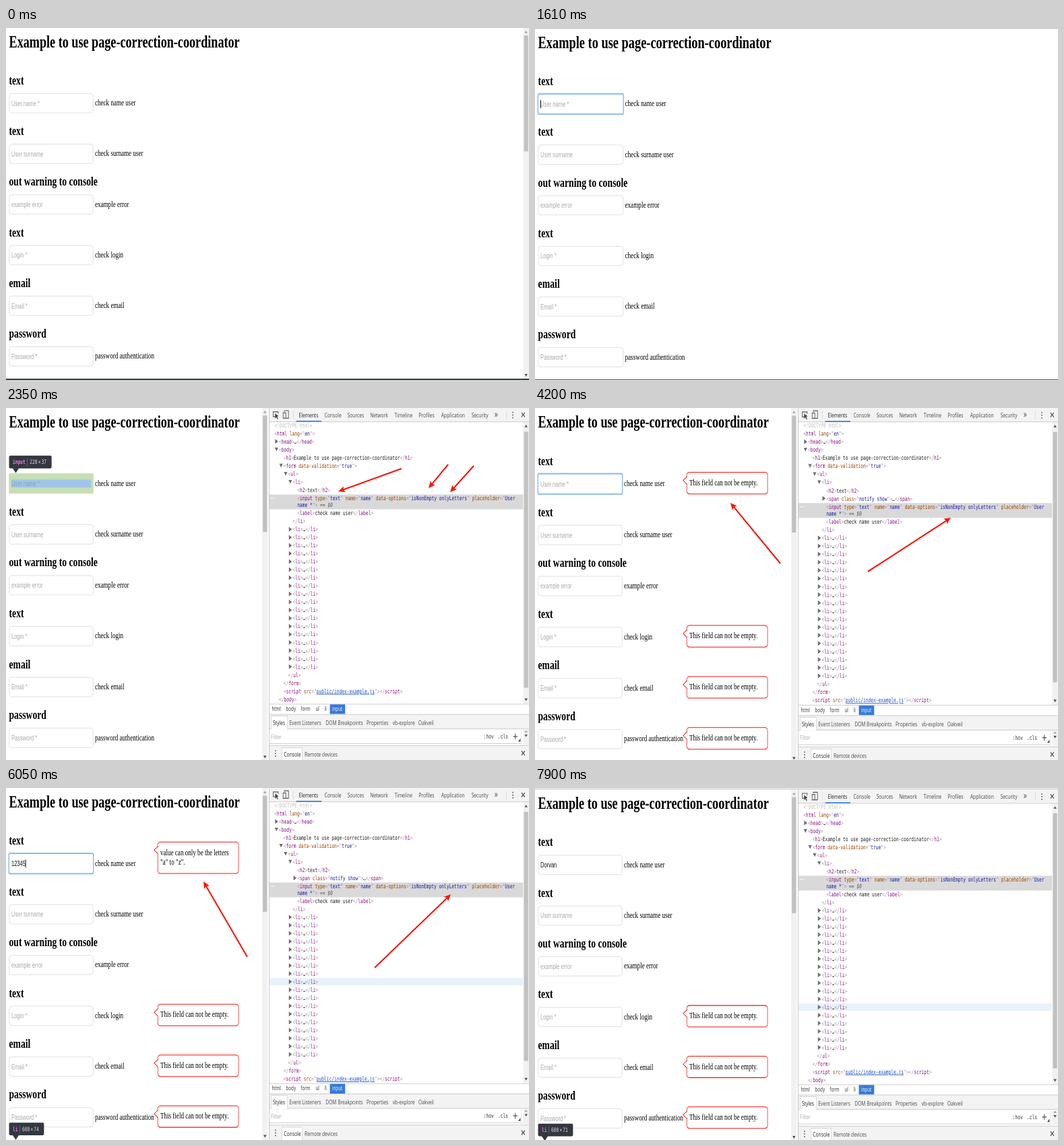
An HTML page for the animation above (8000 ms loop, 776x523 px).

```html
<!DOCTYPE html>
<html lang="en">
<head>
<meta charset="utf-8">
<title>Form check demo</title>
<style>
html, body { margin: 0; width: 100%; height: 100%; overflow: hidden; background: #fff; }
svg { position: absolute; left: 0; top: 0; width: 776px; height: 523px; }
.scene + .scene { opacity: 0; }
text { white-space: pre; }
.h1, .h2 { font: bold 32px "Liberation Serif", serif; }
.h2 { font-size: 24px; }
.label { font: 16px "Liberation Serif", serif; }
.field { font: 13.33px "Liberation Sans", sans-serif; }
.ui { font: 11.8px "Open Sans", sans-serif; fill: #4a4a4a; }
.crumb { font: 11px "Open Sans", sans-serif; fill: #333; }
.code { font: 11px "DejaVu Sans Mono", monospace; fill: #222; }
.br { fill: #a894a6; }
.tag { fill: #881280; }
.attr { fill: #994500; }
.val { fill: #1a1aa6; }
.link { fill: #1a4fc0; text-decoration: underline; }
</style>
</head>
<body>
<svg id="stage" viewBox="0 0 776 523"></svg>
<script>
const LOOP = 8000;
const TITLE = 'Example to use page-correction-coordinator';
const EMPTY = ['This field can not be empty.'];
const LETTERS = ['value can only be the letters', '"a" to "z".'];
const FIELDS = [
  ['text', 'User name *', 'check name user'],
  ['text', 'User surname', 'check surname user'],
  ['out warning to console', 'example error', 'example error'],
  ['text', 'Login *', 'check login'],
  ['email', 'Email *', 'check email'],
  ['password', 'Password *', 'password authentication']
];
const PITCH = 94.4;

const esc = s => s.replace(/&/g, '&amp;').replace(/</g, '&lt;').replace(/>/g, '&gt;');
const raw = (cls, x, y, html, extra = '') => `<text class="${cls}" x="${x}" y="${y}" ${extra}>${html}</text>`;
const text = (cls, x, y, s, fill) => raw(cls, x, y, esc(s), fill ? `style="fill:${fill}"` : '');
const rect = (x, y, w, h, fill, extra = '') =>
  `<rect x="${x}" y="${y}" width="${w}" height="${h}" fill="${fill}" ${extra}/>`;
const poly = (pts, fill) => `<polygon points="${pts}" fill="${fill}"/>`;
const path = (d, stroke, w = 1, fill = 'none') =>
  `<path d="${d}" stroke="${stroke}" stroke-width="${w}" fill="${fill}"/>`;
const span = (cls, s) => `<tspan class="${cls}">${esc(s)}</tspan>`;

// ---- form page ----

function scrollbar(x, top, bottom, t0, t1, upColor) {
  const c = x + 7.5;
  return rect(x, top, 15, bottom - top, '#f1f1f1') +
    rect(x + 2, t0, 11, t1 - t0, '#c1c1c1') +
    poly(`${c - 4},${top + 9.5} ${c + 4},${top + 9.5} ${c},${top + 5}`, upColor) +
    poly(`${c - 4},${bottom - 10} ${c + 4},${bottom - 10} ${c},${bottom - 5}`, '#505050');
}

function bubble(bottom, lines) {
  const h = 21.5 + 18.5 * lines.length, y = bottom - h, m = y + 15;
  const box = rect(396.5, y, 211, h, '#fff', 'rx="7" ry="5" stroke="#f01414" stroke-width="1.3"');
  const tail = poly(`398,${m - 6} 387,${m} 398,${m + 7}`, '#fff') +
    path(`M397 ${m - 7}L387 ${m}L397 ${m + 7}`, '#f01414', 1.3);
  return box + tail + lines.map((s, i) =>
    text('label', 403, bottom - 16 - 18 * (lines.length - 1 - i), s)).join('');
}

function input(y, hint, typed, focus) {
  const edge = focus
    ? rect(7.5, y - .5, 221, 38, '#fff', 'rx="3" stroke="#b4d3f5" stroke-width="3"') +
      rect(8, y, 220, 37, '#fff', 'rx="3" stroke="#6ea6e4" stroke-width="1.3"')
    : rect(8.5, y + .5, 219, 36, '#fff', 'rx="6" ry="5" stroke="#d2d2d2"');
  return edge + text('field', 14, y + 23.3, typed || hint, typed ? '#111' : '#a9a9a9');
}

function form(s) {
  let out = text('h1', 8, 36, TITLE);
  FIELDS.forEach(([head, hint, label], i) => {
    const y = 121.7 + PITCH * i;
    const first = i === 0;
    out += text('h2', 8, y - 16.5, head);
    out += input(y, hint, first && s.typed, first && s.focus);
    out += text('label', 232.3, y + 22.8, label);
    const note = first ? s.note : s.notes && i > 2 && EMPTY;
    if (note) out += bubble(y + 37, note);
  });
  if (s.caret) out += rect(s.caret, 133, 1.6, 15, '#000');
  return out;
}

function inspected() {
  return rect(8, 121.7, 220, 37, '#c5dfb6') +
    rect(8.5, 122.2, 219, 36, 'none', 'stroke="#d9dcae"') +
    rect(14, 132.7, 208, 15, '#a0c5e8') +
    text('field', 14, 145, 'User name *', '#8aa0b5');
}

function tip(y, name, size) {
  const x = 18 + name.length * 6.62 + 6;
  return rect(8, y, x + 62 - 8, 23.5, '#333740', 'rx="3"') +
    poly(`17,${y + 23} 34,${y + 23} 25.5,${y + 32}`, '#333740') +
    raw('code', 17.5, y + 15.5, name, 'style="fill:#ee78e6;font-weight:bold"') +
    rect(x - 2, y + 5, 1, 14, '#8a8d94') +
    raw('code', x + 5, y + 15.5, `${size[0]}<tspan dx="2">×</tspan><tspan dx="2">${size[1]}</tspan>`,
      'style="fill:#dcdcdc"');
}

// ---- inspector ----

const attr = (n, v, cls = 'val') => span('attr', ' ' + n) + span('br', '="') + span(cls, v) + span('br', '"');
const tag = (n, attrs = '') => span('br', '<') + span('tag', n) + attrs + span('br', '>');
const end = n => span('br', '</') + span('tag', n) + span('br', '>');
const whole = (n, body, attrs) => tag(n, attrs) + esc(body) + end(n);

function tree(s) {
  let out = '', y = 36;
  const row = (depth, html, fold) => {
    const x = 701 + 12 * depth;
    if (fold === '+') out += poly(`${x - 10},${y - 8.5} ${x - 10},${y + .5} ${x - 2},${y - 4}`, '#6e6e6e');
    if (fold === '-') out += poly(`${x - 11},${y - 7.5} ${x - 2},${y - 7.5} ${x - 6.5},${y - .5}`, '#6e6e6e');
    out += raw('code', x, y, html);
    y += 15;
  };
  row(0, '<tspan fill="#c0c0c0">&lt;!DOCTYPE html&gt;</tspan>');
  row(0, tag('html', attr('lang', 'en')));
  row(1, whole('head', '…'), '+');
  row(1, tag('body'), '-');
  row(2, whole('h1', TITLE));
  row(2, tag('form', attr('data-validation', 'true')), '-');
  row(3, tag('ul'), '-');
  row(4, tag('li'), '-');
  row(5, whole('h2', 'text'));
  if (s.span) row(5, whole('span', '…', attr('class', 'notify show')), '+');

  out += rect(688, y - 10.5, 663, 27.5, '#d9d9d9');
  for (const x of [692, 696, 700]) out += rect(x, y - 4.5, 2, 2, '#fff');
  row(5, span('br', '<') + span('tag', 'input') + attr('type', 'text') + attr('name', 'name') +
    attr('data-options', 'isNonEmpty onlyLetters') +
    span('attr', ' placeholder') + span('br', '="') + span('val', 'User'));
  y -= 2;
  row(5, span('val', 'name *') + span('br', '">') + '<tspan font-style="italic" fill="#555"> == $0</tspan>');
  row(5, whole('label', 'check name user'));
  row(4, end('li'));
  for (let i = 0; i < 18; i++) {
    if (i === s.hover) out += rect(688, y - 11, 662, 14, '#e9f1fb', 'rx="4"');
    row(4, whole('li', '…'), '+');
  }
  row(3, end('ul'));
  row(2, end('form'));
  row(2, whole('script', '', attr('src', 'public/index-example.js', 'link')));
  row(1, end('body'));
  return out;
}

const dots = (x, y) => [-5, 0, 5].map(d => rect(x - 1.3, y + d - 1, 2.6, 2.2, '#555')).join('');
const cross = (x, y) => path(`M${x - 4.5} ${y - 4}l9 8m0 -8l-9 8`, '#4a4a4a', 1.8);
const labels = (cls, y, list) => list.map(([x, s, c]) => text(cls, x, y, s, c)).join('');

function inspector(s) {
  const line = (x, y, w) => rect(x, y, w, 1, '#c4c4c4');
  let out = rect(684, 0, 682, 660, '#fff') + tree(s) +
    scrollbar(1351, 26, 549, 44, s.span ? 507 : 519, '#505050');

  out += rect(687, 0, 679, 25.5, '#f3f3f3') + line(687, 25, 679);
  out += path('M708 16h-10v-9h13v4', '#555', 1.5) + poly('703,10 712,15 708,16 711,20 709,21 706,17 703,20', '#444');
  out += path('M727 7v-2h11v14h-6M724 9h7v10h-7z', '#555', 1.5);
  out += rect(750, 5, 1, 15, '#ccc') + rect(1307, 5, 1, 15, '#ccc');
  out += rect(758, 23.5, 66, 2.2, '#3e82d9');
  out += labels('ui', 17, [[765, 'Elements', '#222'], [832, 'Console'], [892, 'Sources'], [951, 'Network'],
    [1015, 'Timeline'], [1078, 'Profiles'], [1137, 'Application'], [1216, 'Security']]);
  out += raw('ui', 1276, 17, '»', 'style="font-size:18px"') + dots(1324, 13) + cross(1351, 12.5);

  out += rect(687, 549, 679, 111, '#fff') + line(687, 549, 679);
  out += rect(846, 550, 40, 18, '#3879d9');
  out += labels('crumb', 562, [[694.5, 'html'], [731.5, 'body'], [770, 'form'], [809, 'ul'], [832, 'li'],
    [852, 'input', '#fff']]);

  out += rect(687, 568, 679, 28, '#f3f3f3') + line(687, 568, 679) + line(687, 595, 679);
  out += rect(692.5, 571.5, 43, 25, '#fff', 'stroke="#c8c8c8"') + rect(693, 595, 42, 2, '#fff');
  out += labels('ui', 588, [[697, 'Styles', '#222'], [740, 'Event Listeners'], [835, 'DOM Breakpoints'],
    [942, 'Properties'], [1010, 'vb-explore'], [1077, 'Oakveil']]);

  out += text('ui', 692, 614, 'Filter', '#a9a9a9') + line(687, 622, 658);
  out += labels('code', 613, [[1248, ':hov', '#333'], [1285, '.cls', '#333']]);
  out += path('M1325 609.5h11m-5.5 -5.5v11', '#444', 1.6) + poly('1338,619 1344,619 1344,613', '#444');
  out += rect(1346, 597, 1, 29, '#d0d0d0') + rect(1351, 597, 15, 28, '#f1f1f1') +
    poly('1354.5,602 1362.5,602 1358.5,598', '#a3a3a3') + poly('1354.5,606 1362.5,606 1358.5,610.5', '#505050');

  out += rect(687, 626, 679, 34, '#f3f3f3') + line(687, 626, 679);
  out += rect(720.5, 630.5, 53, 32, '#fff', 'stroke="#c8c8c8"');
  out += dots(704, 641) + cross(1351, 640.5);
  out += labels('ui', 646.5, [[726, 'Console', '#222'], [780, 'Remote devices']]);
  return out + rect(687, 0, 1, 660, '#a3a3a3');
}

// ---- overlays in stage pixels ----

function arrow([x0, y0, x1, y1]) {
  const a = Math.atan2(y1 - y0, x1 - x0), c = Math.cos(a), s = Math.sin(a);
  const at = (back, side) => `${x1 - c * back - s * side},${y1 - s * back + c * side}`;
  return path(`M${x0} ${y0}L${at(6, 0)}`, '#f5170a', 2.1) +
    poly([at(0, 0), at(10, 4.6), at(8, 0), at(10, -4.6)].join(' '), '#f5170a');
}

const SCENES = [
  { at: 0, sy: .797, bar: 1351, over: rect(0, 521, 776, 2, '#25453f') },
  { at: 500, sx: .5744, sy: .797, oy: 1.2, focus: true, caret: 14,
    over: rect(0, 0, 776, 1, '#b5b5b5') + rect(0, 522, 776, 1, '#47635e') },
  { at: 2350, sy: .8007, bar: 669, tools: true, page: inspected() + tip(88.5, 'input', [220, 37]),
    arrows: [[587, 90, 493, 124], [656, 84, 627, 119], [694, 86, 659, 125]] },
  { at: 4200, sy: .8034, oy: .2, bar: 669, tools: true, span: true, focus: true, note: EMPTY, notes: true,
    arrows: [[364, 231, 290, 141], [494, 243, 617, 163]] },
  { at: 6050, sy: .799, oy: .2, bar: 669, tools: true, span: true, focus: true, typed: '12345', caret: 50.5,
    note: LETTERS, notes: true, hover: 8, page: tip(622, 'li', [600, 74]),
    arrows: [[358, 251, 293, 139], [547, 267, 660, 158]] },
  { at: 7900, sy: .798, oy: 2.4, bar: 669, tools: true, typed: 'Dorvan', notes: true, hover: 12,
    page: tip(622, 'li', [600, 71]), over: rect(0, 1, 776, 1, '#bdbdbd') }
];

function scene(s) {
  const { sx = .568, sy, oy = 0 } = s;
  return `<g class="scene"><rect width="776" height="523" fill="#fff"/>
    <g transform="translate(0 ${oy}) scale(${sx} ${sy})">${form(s)}${s.page || ''}
    ${s.bar ? scrollbar(s.bar, 0, 655, 14, 230, '#a3a3a3') : ''}${s.tools ? inspector(s) : ''}</g>
    ${(s.arrows || []).map(arrow).join('')}${s.over || ''}</g>`;
}

document.getElementById('stage').innerHTML = SCENES.map(scene).join('');

// Scenes are opaque and stacked: the first always shows, each later one covers it until the loop ends.
document.querySelectorAll('.scene').forEach((el, i) => {
  if (i === 0) return;
  const step = (offset, opacity) => ({ offset, opacity, easing: 'step-end' });
  el.animate([step(0, 0), step(SCENES[i].at / LOOP, 1), step(1, 1)], { duration: LOOP, iterations: Infinity });
});
</script>
</body>
</html>
```
